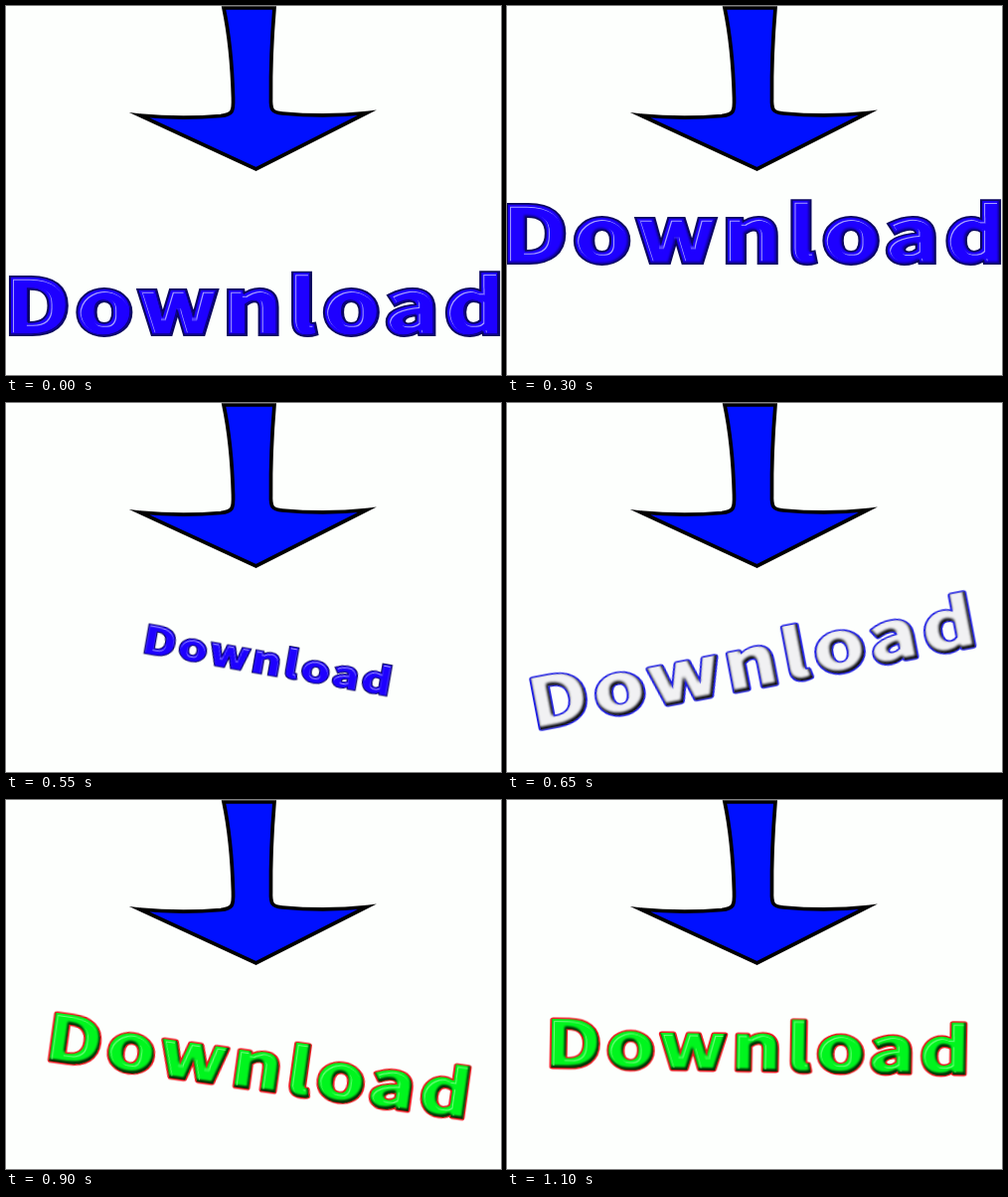
Write an HTML page that moves like this. It is 498x371 px and loops after 1150 ms.

```html
<!DOCTYPE html>
<html lang="en">
<head>
<meta charset="utf-8">
<title>Download</title>
<style>
  html, body { margin: 0; width: 100%; height: 100%; overflow: hidden; background: #fdfffd; }
  svg { display: block; width: 498px; height: 371px; }

  #word {
    font: 700 75px "Noto Sans CJK JP", "Noto Sans CJK SC", "Noto Sans CJK KR", "Noto Sans", sans-serif;
    letter-spacing: 4.8px;
    text-anchor: middle;
  }
  .arrow { fill: #0010ff; stroke: #000; stroke-width: 3.7; stroke-miterlimit: 10; }
  .rim { stroke-width: 6; }
  .face { stroke-width: 2.6; }

  .blue .rim { fill: #0b0760; stroke: #0b0760; }
  .blue .face { fill: #1e00ff; stroke: #1e00ff; filter: url(#blueBevel); }
  .white .rim { fill: #1a1ae6; stroke: #1a1ae6; stroke-linejoin: round; }
  .white .face { fill: #f1f1f3; stroke: #f1f1f3; filter: url(#whiteBevel); }
  .green .rim { fill: #f0141e; stroke: #f0141e; stroke-linejoin: round; }
  .green .face { fill: #00f51e; stroke: #00f51e; filter: url(#greenBevel); }

  .pose { animation: pose 1150ms infinite; }
  .blue { animation: blue 1150ms step-end infinite; }
  .white { animation: white 1150ms step-end infinite; }
  .green { animation: green 1150ms step-end infinite; }

  /* One step lasts 50 ms */
  @keyframes pose {
    0%      { transform: translate(250.5px, 300px) rotate(0deg) scale(.992); animation-timing-function: steps(6); }
    26.086% { transform: translate(248.5px, 228px) rotate(0deg) scale(1); animation-timing-function: steps(3); }
    39.13%  { transform: translate(261.5px, 252px) rotate(7.4deg) scale(.595); animation-timing-function: steps(2); }
    47.826% { transform: translate(264px, 258px) rotate(10deg) scale(.5); animation-timing-function: steps(1); }
    52.173% { transform: translate(259px, 271px) rotate(-10.9deg) scale(.935); animation-timing-function: steps(1); }
    56.521% { transform: translate(247.5px, 259.5px) rotate(-10.8deg) scale(.9); animation-timing-function: steps(3); }
    69.565% { transform: translate(264px, 203.5px) rotate(-10.1deg) scale(.6); animation-timing-function: steps(1); }
    73.913% { transform: translate(256px, 271px) rotate(9.75deg) scale(.855); animation-timing-function: steps(3); }
    86.956% { transform: translate(254.5px, 257px) rotate(4.5deg) scale(.843); animation-timing-function: steps(2); }
    95.652% { transform: translate(253.5px, 247.5px) rotate(1deg) scale(.843); animation-timing-function: steps(1); }
    100%    { transform: translate(250.5px, 300px) rotate(0deg) scale(.992); }
  }
  @keyframes blue { 0% { opacity: 1; } 52.173%, 100% { opacity: 0; } }
  @keyframes white { 0% { opacity: 0; } 52.173% { opacity: 1; } 73.913%, 100% { opacity: 0; } }
  @keyframes green { 0% { opacity: 0; } 73.913%, 100% { opacity: 1; } }
</style>
</head>
<body>
<svg viewBox="0 0 498 371">
  <defs>
    <text id="word" transform="scale(1.24 1)" x="1.5" y="29">Download</text>

    <!-- Shade along the lower right edge, thin glint inside the upper left edge -->
    <filter id="blueBevel" x="-5%" y="-10%" width="110%" height="120%" color-interpolation-filters="sRGB">
      <feGaussianBlur in="SourceAlpha" stdDeviation=".8"/>
      <feOffset dx="-.7" dy="-1" result="moved"/>
      <feFlood flood-color="#0c0080"/>
      <feComposite in2="SourceAlpha" operator="in"/>
      <feComposite in2="moved" operator="out" result="shade"/>
      <feMorphology in="SourceAlpha" operator="erode" radius="2" result="core"/>
      <feOffset in="core" dx=".8" dy="1.2" result="inner"/>
      <feFlood flood-color="#a7a0ff"/>
      <feComposite in2="core" operator="in"/>
      <feComposite in2="inner" operator="out" result="glint"/>
      <feMerge>
        <feMergeNode in="SourceGraphic"/><feMergeNode in="shade"/><feMergeNode in="glint"/>
      </feMerge>
    </filter>

    <filter id="whiteBevel" x="-5%" y="-10%" width="110%" height="120%" color-interpolation-filters="sRGB">
      <feGaussianBlur in="SourceAlpha" stdDeviation="2"/>
      <feOffset dx="-1.3" dy="-2.2" result="moved"/>
      <feFlood flood-color="#080810"/>
      <feComposite in2="SourceAlpha" operator="in"/>
      <feComposite in2="moved" operator="out" result="shade"/>
      <feMerge>
        <feMergeNode in="SourceGraphic"/><feMergeNode in="shade"/><feMergeNode in="shade"/>
      </feMerge>
    </filter>

    <filter id="greenBevel" x="-5%" y="-10%" width="110%" height="120%" color-interpolation-filters="sRGB">
      <feGaussianBlur in="SourceAlpha" stdDeviation="1.4"/>
      <feOffset dx="-1" dy="-1.8" result="moved"/>
      <feFlood flood-color="#002a06"/>
      <feComposite in2="SourceAlpha" operator="in"/>
      <feComposite in2="moved" operator="out" result="shade"/>
      <feMorphology in="SourceAlpha" operator="erode" radius="2.6" result="core"/>
      <feOffset in="core" dx="1" dy="1.2" result="inner"/>
      <feFlood flood-color="#6dff7c"/>
      <feComposite in2="core" operator="in"/>
      <feComposite in2="inner" operator="out" result="glint"/>
      <feMerge>
        <feMergeNode in="SourceGraphic"/><feMergeNode in="shade"/><feMergeNode in="shade"/><feMergeNode in="glint"/>
      </feMerge>
    </filter>
  </defs>

  <path class="arrow" d="M219 2H270Q266 50 266.5 92C266 105 268 107 278 108Q322 112 363 107.5L251.5 164L134.5 110Q176 114 216 110.5C228 109 229 106.5 228.5 92Q227 40 219 2Z"/>

  <g class="pose">
    <g class="blue"><use class="rim" href="#word"/><use class="face" href="#word"/></g>
    <g class="white"><use class="rim" href="#word"/><use class="face" href="#word"/></g>
    <g class="green"><use class="rim" href="#word"/><use class="face" href="#word"/></g>
  </g>
</svg>
</body>
</html>
```
